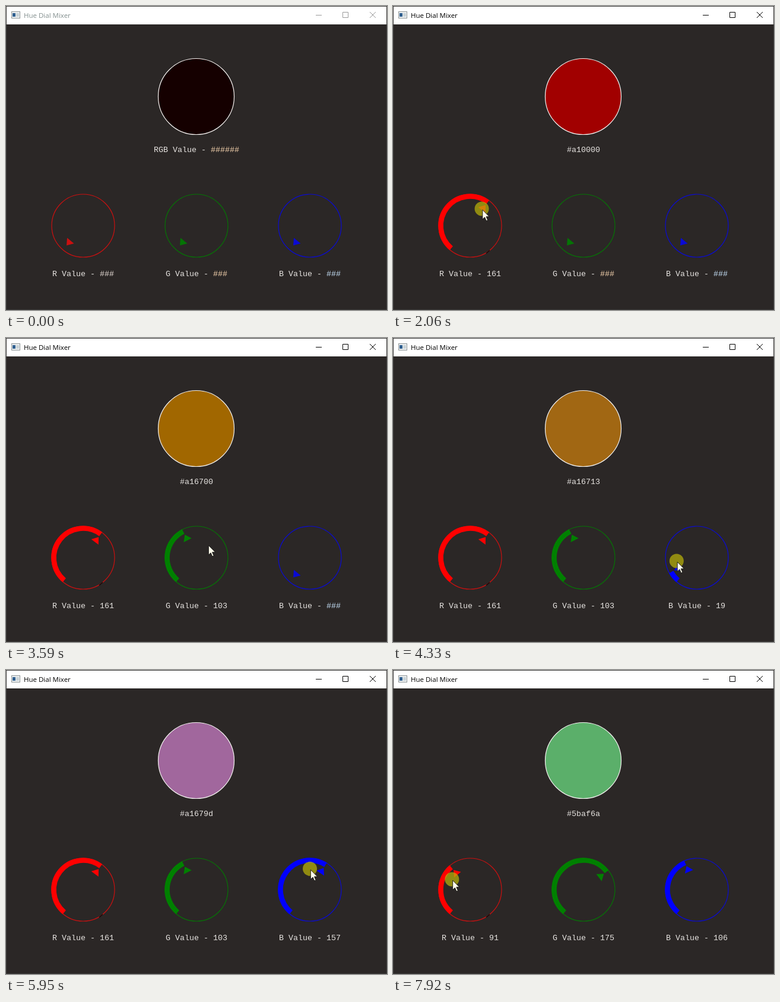
Animation, 642 px wide and 512 px high, one loop 8000 ms. Source, as an HTML page:

```html
<!DOCTYPE html>
<html lang="en">
<head>
<meta charset="utf-8">
<title>Hue Dial Mixer</title>
<style>
html, body { margin: 0; width: 100%; height: 100%; overflow: hidden; background: #2b2726; }
svg { display: block; width: 642px; height: 512px; }
.title { font: 11.5px "Open Sans", "Noto Sans", sans-serif; }
.label { font: 13.333px "Courier New", "Liberation Mono", monospace; fill: #e6e3e0; text-anchor: middle; }
</style>
</head>
<body>
<svg viewBox="0 0 642 512" xmlns="http://www.w3.org/2000/svg">
  <rect width="642" height="512" fill="#2b2726"/>
  <rect x="1" y="1" width="640" height="30" fill="#fff"/>
  <rect x=".5" y=".5" width="641" height="511" fill="none" stroke="#3b3a39"/>
  <g>
    <rect x="9.5" y="9.5" width="14" height="11" fill="#eef1f2" stroke="#8d9496"/>
    <rect x="11" y="12" width="5" height="6" fill="#2f5f8f"/>
    <rect x="17" y="12" width="5" height="6" fill="#c9d2d6"/>
  </g>
  <text id="title" class="title" x="30" y="20">Hue Dial Mixer</text>
  <path id="buttons" fill="none" d="M522 15.5h10M567.5 10.5h9v9h-9zM613 10l10 10M623 10l-10 10"/>
  <circle id="swatch" cx="320.5" cy="152.5" r="64" stroke="#f4f2f0" stroke-width="1.2"/>
  <text id="hex" class="label" x="321" y="246"></text>
  <g id="dials"></g>
  <path id="nick" d="M157 416.5l6-5" stroke="#0c0a0a" stroke-width="1.6"/>
  <g id="pointer">
    <circle id="halo" cx="-.8" cy="-1.2" r="12" fill="#beb608" fill-opacity=".7"/>
    <path d="M.5 .5V16.5l3.7-3.5 2.6 6 2.5-1.1-2.6-5.9h5.1z" fill="#fffdec" stroke="#111" stroke-width=".9"/>
  </g>
</svg>
<script>
const LOOP = 8000, STEP = 90, PHASE = 80;
const START = 50, SWEEP = 280, CY = 370, SPACING = 191;
const LEAD = 100, REACH = 34, TRAVEL = 450;
const $ = id => document.getElementById(id);

const dials = [
  { name: 'R', color: '#ff0000', dim: '#cc1010', hash: '#e6dcd6' },
  { name: 'G', color: '#008000', dim: '#057405', hash: '#f5d3ae' },
  { name: 'B', color: '#0000ff', dim: '#0a0ad4', hash: '#c4def5' }
];
const drags = [
  { dial: 0, start: 1340, end: 2060, from: 21, to: 161 },
  { dial: 1, start: 2690, end: 3410, from: 12, to: 103 },
  { dial: 2, start: 4220, end: 5660, from: 5, to: 234 },
  { dial: 2, start: 5660, end: 6110, from: 234, to: 106 },
  { dial: 1, start: 6560, end: 6920, from: 103, to: 211 },
  { dial: 1, start: 6920, end: 7190, from: 211, to: 175 },
  { dial: 0, start: 7550, end: 8090, from: 161, to: 56 }
];
const entry = { start: 260, end: 800, from: [402, 475], to: [111, 394] };

const mix = (a, b, f) => a + (b - a) * f;
const mixPoint = (p, q, f) => p.map((v, i) => mix(v, q[i], f));
const progress = (t, a, b) => Math.min(1, Math.max(0, (t - a) / (b - a)));
const lastDrag = (t, test = () => true) => drags.filter(g => g.start <= t && test(g)).pop();

// Current value of a dial, or null while untouched
function valueAt(dial, t) {
  const g = lastDrag(t, g => g.dial === dial);
  return g ? mix(g.from, g.to, progress(t, g.start, g.end)) : null;
}

// Dial value to angle, clockwise from the left
const angle = v => (v * SWEEP / 255 - START) * Math.PI / 180;
const polar = (x, r, a) => [x - r * Math.cos(a), CY - r * Math.sin(a)];

function arc(x, v) {
  const a = angle(0), b = angle(v), r = 49.5;
  return `M${polar(x, r, a)}A${r} ${r} 0 ${b - a > Math.PI ? 1 : 0} 1 ${polar(x, r, b)}`;
}
function knob(x, v) {
  const a = angle(v), spread = Math.atan2(7.5, 33), r = Math.hypot(7.5, 33);
  return `M${polar(x, 43.5, a)}L${polar(x, r, a + spread)}L${polar(x, r, a - spread)}z`;
}

// The hand runs a little ahead of the dial it turns
const aim = (dial, t) => polar(dials[dial].x, REACH, angle(valueAt(dial, t + LEAD)));

function pointerAt(t) {
  const g = lastDrag(t);
  if (!g) return mixPoint(entry.from, entry.to, progress(t, entry.start, entry.end));
  if (t <= g.end) return aim(g.dial, t);
  const next = drags[drags.indexOf(g) + 1];
  const leave = g.end + STEP, arrive = Math.min(next.start, leave + TRAVEL);
  return mixPoint(aim(g.dial, g.end), aim(next.dial, next.start), progress(t, leave, arrive));
}

function set(el, attrs) {
  for (const k in attrs) el.setAttribute(k, attrs[k]);
}
function add(tag, attrs) {
  const el = document.createElementNS('http://www.w3.org/2000/svg', tag);
  set(el, attrs);
  return $('dials').appendChild(el);
}
function write(el, html) {
  if (el.innerHTML !== html) el.innerHTML = html;
}
const hashes = (d, n) => `<tspan fill="${d.hash}">${'#'.repeat(n)}</tspan>`;

dials.forEach((d, i) => {
  d.x = 130 + SPACING * i;
  add('circle', { cx: d.x, cy: CY, r: 53, fill: 'none', stroke: d.dim, 'stroke-width': 1.2 });
  d.arc = add('path', { fill: 'none', stroke: d.color, 'stroke-width': 8.5 });
  d.knob = add('path', {});
  d.text = add('text', { class: 'label', x: d.x, y: 455 });
});

function draw(time) {
  const t = Math.floor((time - PHASE) / STEP) * STEP + PHASE;
  const drag = lastDrag(t), active = Boolean(drag);

  const rgb = dials.map((d, i) => {
    const raw = valueAt(i, t), on = raw !== null, v = Math.round(raw || 0);
    set(d.arc, { d: on ? arc(d.x, v) : '' });
    set(d.knob, { d: knob(d.x, v), fill: on ? d.color : d.dim });
    write(d.text, `${d.name} Value - ${on ? v : hashes(d, 3)}`);
    return v;
  });

  const hex = '#' + rgb.map(v => v.toString(16).padStart(2, '0')).join('');
  write($('hex'), active ? hex : 'RGB Value - ' + hashes(dials[1], 6));
  set($('swatch'), { fill: active ? hex : '#150000' });
  set($('title'), { fill: active ? '#000' : '#84908f' });
  set($('buttons'), { stroke: active ? '#000' : '#999' });
  set($('nick'), { visibility: t >= entry.end ? 'visible' : 'hidden' });

  set($('pointer'), {
    visibility: t >= entry.start ? 'visible' : 'hidden',
    transform: `translate(${pointerAt(t)})`
  });
  set($('halo'), { display: active && t <= drag.end ? 'inline' : 'none' });
}

const begin = performance.now();
function tick() {
  draw((performance.now() - begin) % LOOP);
  requestAnimationFrame(tick);
}
draw(0);
requestAnimationFrame(tick);
</script>
</body>
</html>
```
